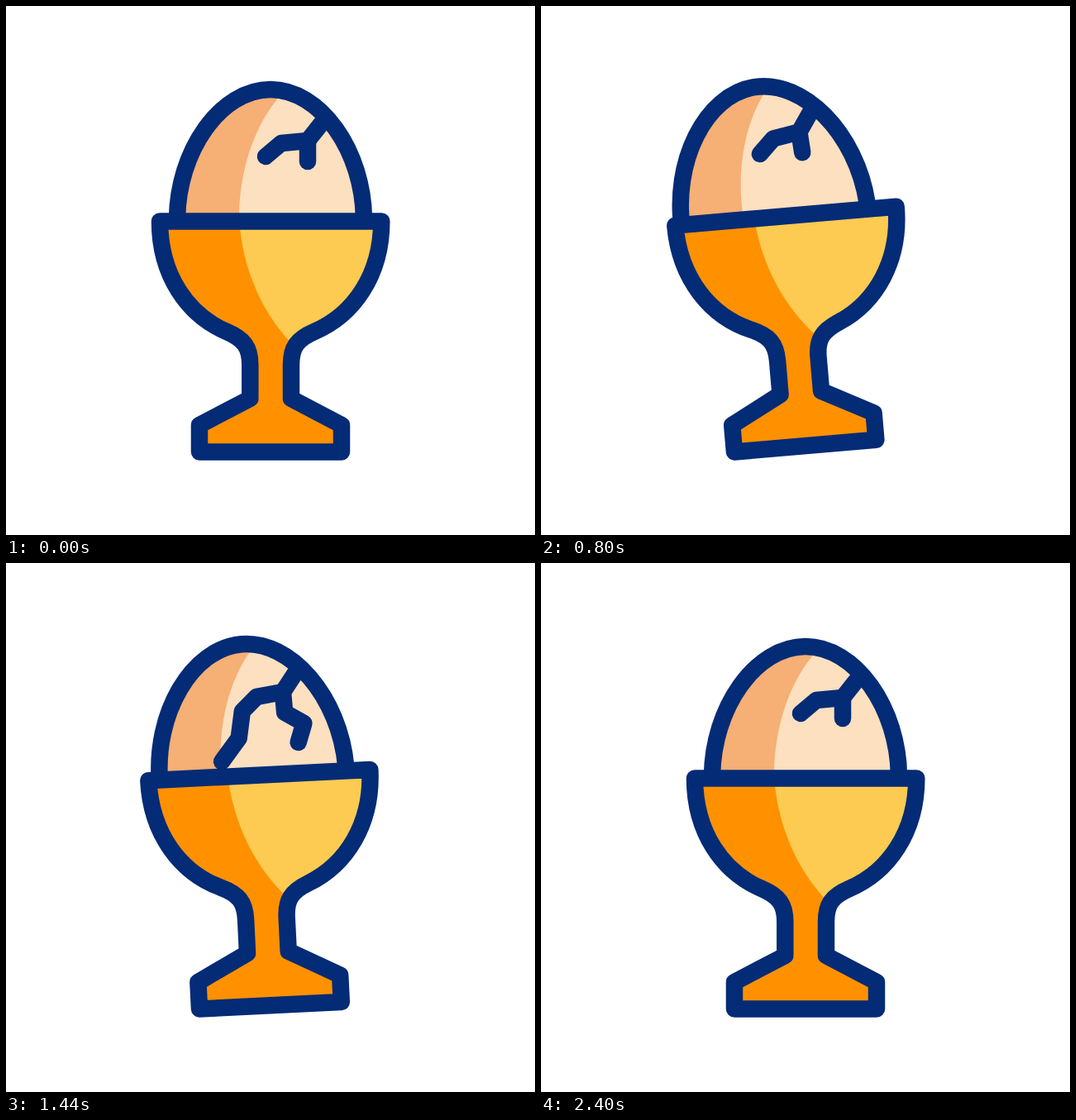
An HTML page that plays this animation: 640 by 640 pixels, repeating every 3 s.

```html
<!DOCTYPE html>
<html lang="en">
<head>
<meta charset="utf-8">
<title>Egg cup</title>
<style>
  html, body { margin: 0; width: 100%; height: 100%; overflow: hidden; background: #fff; }
  svg { display: block; width: 100%; height: 100%; }
  .line { fill: none; stroke: #042b76; stroke-width: 20.5; stroke-linecap: round; stroke-linejoin: round; }
</style>
</head>
<body>
<svg viewBox="0 0 640 640">
  <defs>
    <path id="bowl" d="M186 260.5H454.3C454.3 326 420 374 373 394C352 403 345 413 345 434V475L406 507V539.5H234V507L295.3 475V434C295.3 413 288 403 267 394C220 374 186 326 186 260.5Z"/>
  </defs>
  <g id="cup">
    <g id="egg">
      <path fill="#f6af74" d="M207 260C207 175 260 101 320 101S433 175 433 260V278H225Z"/>
      <path fill="#fce0bf" d="M334 106C300 143 282 200 282 258V278H433V260C433 175 380 101 320 101Z"/>
      <path class="line" style="stroke-linecap:butt" d="M207 262V260C207 175 260 101 320 101S433 175 433 260V275"/>
      <path class="line" d="M384 139L365 163"/>
      <path class="line" id="left" d="M365 163L333 166L314 182L307 214L279 246"/>
      <path class="line" id="right" d="M365 163V188L387 203L376 231"/>
    </g>
    <use href="#bowl" fill="#ff9100"/>
    <path fill="#fdcb51" d="M282 260C287 318 308 368 345 408L373 394C420 374 454 326 454 260Z"/>
    <use href="#bowl" class="line"/>
  </g>
</svg>
<script>
const LOOP = 3000;
const $ = id => document.getElementById(id);

// Hops: start, end, peak tilt in degrees.
const hops = [
  [20, 995, 7.7],
  [995, 1260, 4.3],
  [1260, 1550, 3],
  [1550, 1840, 2.05]
];

// Crack lengths, growing by one stage at each time in grow.
const grow = [995, 1260, 1600];
const lengths = { left: [57, 90, 125, 132], right: [25, 45, 76, 81] };

const clamp = x => Math.min(1, Math.max(0, x));
const easeOut = x => 1 - (1 - x) ** 2;
const smooth = x => x * x * (3 - 2 * x);

function tilt(t) {
  const hop = hops.find(([a, b]) => t >= a && t < b);
  if (!hop) return 0;
  const [a, b, peak] = hop;
  const x = (t - a) / (b - a);
  return -peak * 4 * x * (1 - x);
}

function crackLength(stages, t) {
  let len = stages[0];
  grow.forEach((start, i) => {
    len += (stages[i + 1] - stages[i]) * easeOut(clamp((t - start) / 200));
  });
  return len + (stages[0] - len) * smooth(clamp((t - 2000) / 400));
}

function draw() {
  const t = performance.now() % LOOP;
  const angle = tilt(t);
  $('cup').setAttribute('transform', `rotate(${angle} 234 539.5)`);
  $('egg').setAttribute('transform', `rotate(${angle * 0.81} 320 447)`);
  for (const id in lengths) {
    $(id).setAttribute('stroke-dasharray', `${crackLength(lengths[id], t)} 999`);
  }
  requestAnimationFrame(draw);
}
draw();
</script>
</body>
</html>
```
